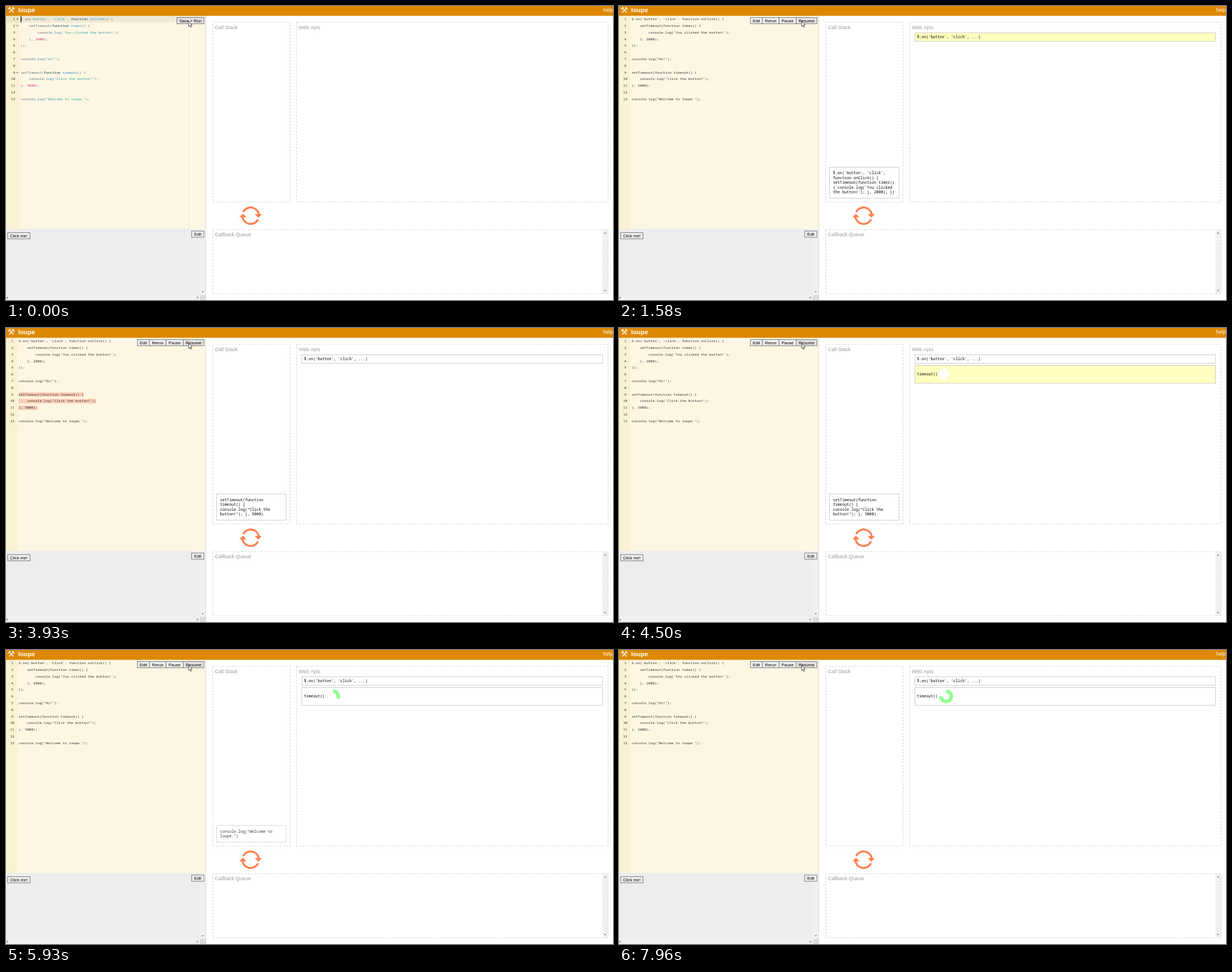
An HTML page with a canvas that plays this animation: 1074 by 521 pixels, repeating every 7.99 s.

```html
<!DOCTYPE html>
<html lang="en">
<head>
<meta charset="utf-8">
<title>Event loop demo</title>
<style>
html, body { margin: 0; width: 100%; height: 100%; overflow: hidden; background: #fff; }
canvas { display: block; }
</style>
</head>
<body>
<canvas id="stage" width="1074" height="521"></canvas>
<script>
const ctx = document.getElementById('stage').getContext('2d');
const LOOP = 7990;
const SANS = '"Liberation Sans", Arial, sans-serif';
const MONO = '"Noto Sans Mono", "DejaVu Sans Mono", monospace';
const CODE_SIZE = 6.19, CARD_SIZE = 6.7;
const LINE = 11.81, CARD_LINE = 8.44;
const TOP = 17.4;
const RUN_AT = 590, TIMER_AT = 4500;

const code = [
  "$.on('button', 'click', function onClick() {",
  '    setTimeout(function timer() {',
  "        console.log('You clicked the button!');",
  '    }, 2000);',
  '});',
  '',
  'console.log("Hi!");',
  '',
  'setTimeout(function timeout() {',
  '    console.log("Click the button!");',
  '}, 5000);',
  '',
  'console.log("Welcome to loupe.");'
];

// Calls on the stack: highlighted source lines, push and pop times
const calls = [
  { from: 0, to: 4, push: 820, pop: 1580, text: [
    "$.on('button', 'click',", 'function onClick() {', 'setTimeout(function timer()',
    "{ console.log('You clicked", "the button!'); }, 2000); })"] },
  { from: 6, to: 6, push: 2310, pop: 3010, text: ['console.log("Hi!")'] },
  { from: 8, to: 10, push: 3790, pop: 4500, text: [
    'setTimeout(function', 'timeout() {', 'console.log("Click the', 'button!"); }, 5000)'] },
  { from: 12, to: 12, push: 5250, pop: 5900, text: ['console.log("Welcome to', 'loupe.")'] }
];

const clamp = v => Math.max(0, Math.min(1, v));

function rect(x, y, w, h, color) {
  ctx.fillStyle = color;
  ctx.fillRect(x, y, w, h);
}

function poly(color, ...points) {
  ctx.fillStyle = color;
  ctx.beginPath();
  points.forEach(p => ctx.lineTo(p[0], p[1]));
  ctx.closePath();
  ctx.fill();
}

// Laid out at ten times the size so that small advances stay fractional
function text(str, x, y, size, family, color, align = 'left', weight = '') {
  ctx.save();
  ctx.translate(x, y);
  ctx.scale(0.1, 0.1);
  ctx.font = `${weight} ${size * 10}px ${family}`;
  ctx.textAlign = align;
  ctx.fillStyle = color;
  ctx.fillText(str, 0, 0);
  const width = ctx.measureText(str).width / 10;
  ctx.restore();
  return width;
}

function frame(x, y, w, h, fill, stroke) {
  rect(x, y, w, h, fill);
  ctx.strokeStyle = stroke;
  ctx.lineWidth = 1;
  ctx.strokeRect(x, y, w, h);
}

function button(label, x, y, w, hover) {
  frame(x, y, w, 11, hover ? '#e6e1e1' : '#efefef', '#777');
  text(label, x + w / 2, y + 8.2, 7.5, SANS, '#000', 'center');
}

function panel(label, x, y, w, h) {
  ctx.strokeStyle = '#d3d3d3';
  ctx.lineWidth = 1.13;
  ctx.setLineDash([3.4, 2.25]);
  ctx.strokeRect(x, y, w, h);
  ctx.setLineDash([]);
  text(label, x + 3.8, y + 12, 9, SANS, '#999');
}

function arrow(x, y, dx, dy) {
  const tip = [x + dx * 1.3, y + dy * 1.3], bx = x - dx * 1.3, by = y - dy * 1.3;
  poly('#8a8a8a', tip, [bx + dy * 2.4, by + dx * 2.4], [bx - dy * 2.4, by - dx * 2.4]);
}

function drawHeader() {
  rect(0, 0, 1074, TOP, '#dd8800');
  text('\u2692', 9.3, 12.1, 14.6, '"DejaVu Sans", sans-serif', '#fff', 'center');
  text('loupe', 21.6, 11.1, 11.25, SANS, '#fff', 'left', 'bold');
  text('help', 1056.8, 10.2, 9, SANS, '#fff');
}

function drawLoopIcon() {
  const color = '#ff7f50';
  ctx.strokeStyle = color;
  ctx.lineWidth = 3.5;
  for (const side of [0, Math.PI]) {
    ctx.save();
    ctx.translate(432.8, 371.6);
    ctx.rotate(side);
    ctx.beginPath();
    ctx.arc(0, 0, 14.6, Math.PI + 0.45, Math.PI * 2 - 0.1);
    ctx.stroke();
    poly(color, [7.2, -2.8], [20, -2.8], [13.6, 3.6]);
    ctx.restore();
  }
}

function drawPanels() {
  panel('Call Stack', 365.8, 28.8, 136.7, 318.4);
  panel('Web Apis', 514.2, 28.8, 551, 318.4);
  rect(1055, 397, 10, 112.5, '#f1f1f1');
  panel('Callback Queue', 365.8, 396.2, 699.4, 113.8);
  arrow(1060, 402, 0, -1);
  arrow(1060, 504.5, 0, 1);
  drawLoopIcon();
}

function drawPreview() {
  rect(0, 395, 353, 126, '#ededed');
  rect(343, 395, 10, 117, '#f1f1f1');
  rect(0, 512, 343, 9, '#f1f1f1');
  rect(343, 512, 10, 9, '#dcdcdc');
  arrow(348, 506.8, 0, 1);
  arrow(1.8, 516.8, -1, 0);
  arrow(339, 516.8, 1, 0);
  button('Click me!', 2.9, 401.6, 39.6);
  button('Edit', 328.5, 398.8, 21.7);
  rect(353, TOP, 1, 521 - TOP, '#d8d8d8');
}

function tokenColor(token) {
  if (/^['"]/.test(token)) return '#2aa198';
  if (/^\d/.test(token)) return '#d33682';
  if (token === 'function') return '#073642';
  if (/^(log|timer|timeout|onClick)$/.test(token)) return '#268bd2';
  return '#586e75';
}

function drawTokens(line, x, y) {
  for (const token of line.match(/'[^']*'|"[^"]*"|\w+|[^\w'"]+/g) || []) {
    x += text(token, x, y, CODE_SIZE, MONO, tokenColor(token));
  }
}

const baseline = i => 25.2 + LINE * i;

function drawEditor() {
  rect(0, TOP, 353, 395 - TOP, '#fdf6e3');
  rect(0, TOP, 24, 395 - TOP, '#fbf1d3');
  rect(24, TOP, 329, LINE, '#eee8d5');
  rect(0, TOP, 24, LINE, '#ede5c1');
  rect(323, TOP, 1, 395 - TOP, '#f1ead7');
  code.forEach((line, i) => {
    const y = baseline(i);
    text(i + 1, 16.3, y, CODE_SIZE, MONO, '#333', 'right');
    if (i < 2 || i === 8) poly('#333', [18.4, y - 2.8], [21.6, y - 2.8], [20, y - 1]);
    drawTokens(line, 26, y);
  });
  rect(26, TOP, 1.2, LINE, '#000');
  button('Save + Run', 302.5, 20.5, 47.7, true);
}

function drawRunner(t) {
  rect(0, TOP, 353, 395 - TOP, '#fdf6e3');
  rect(0, TOP, 20, 395 - TOP, '#fbf1d3');
  const active = calls.find(c => t >= c.push && t < c.pop);
  code.forEach((line, i) => {
    const y = baseline(i);
    if (active && i >= active.from && i <= active.to) {
      rect(22.3, y - 5.9, line.length * CODE_SIZE * 0.6, 8, '#fccdb8');
    }
    text(i + 1, 11, y, CODE_SIZE, MONO, '#333', 'center');
    text(line, 22.3, y, CODE_SIZE, MONO, '#333');
  });
  button('Edit', 232.5, 20.5, 21.3);
  button('Rerun', 253.8, 20.5, 29.4);
  button('Pause', 283.2, 20.5, 30.3);
  button('Resume', 313.5, 20.5, 36.7, true);
}

function drawCall({ text: lines, push, pop }, t) {
  const alpha = Math.min(clamp((t - push) / 110), 1 - clamp((t - pop) / 150));
  if (alpha <= 0) return;
  const h = 12.7 + CARD_LINE * lines.length;
  ctx.globalAlpha = alpha;
  frame(372.5, 340.5 - h, 123, h, '#fff', '#ccc');
  lines.forEach((line, i) =>
    text(line, 378.8, 332.2 - CARD_LINE * (lines.length - 1 - i), CARD_SIZE, MONO, '#000'));
  ctx.globalAlpha = 1;
}

function drawApi(label, start, y, h, t) {
  const white = clamp((t - start) / 150);
  const blue = Math.round(191 + 64 * white);
  frame(523.5, y, 532, h, `rgb(255,255,${blue})`, '#ccc');
  text(label, 527.3, y + h / 2 + 2.1, CARD_SIZE, MONO, '#000');
}

function sector(cx, cy, r, from, to, color) {
  ctx.fillStyle = color;
  ctx.beginPath();
  ctx.moveTo(cx, cy);
  ctx.arc(cx, cy, r, from - Math.PI / 2, to - Math.PI / 2);
  ctx.fill();
}

function drawTimer(t) {
  const cx = 578.7, cy = 82.1, turn = Math.PI * 2;
  sector(cx, cy, 12.4, Math.PI, turn, '#fff');
  if (t >= TIMER_AT + 35) {
    const angle = (t - 4402) * 0.0759 * Math.PI / 180;
    sector(cx, cy, 12.4, 0, angle, '#96fe96');
  }
  sector(cx, cy, 5.8, 0, turn, '#fff');
}

function drawPointer() {
  const shape = [[323.2, 27], [323.2, 36.2], [325.2, 34.4], [326.6, 37.7],
    [328.1, 37], [326.7, 33.9], [329.4, 33.7]];
  poly('#fff', ...shape);
  ctx.strokeStyle = '#222';
  ctx.lineWidth = 0.8;
  ctx.stroke();
}

function draw(t) {
  rect(0, 0, 1074, 521, '#fff');
  drawPanels();
  if (t < RUN_AT) drawEditor();
  else drawRunner(t);
  drawPreview();
  drawHeader();
  calls.forEach(call => drawCall(call, t));
  if (t >= calls[0].pop) drawApi("$.on('button', 'click', ...)", calls[0].pop, 47.5, 15, t);
  if (t >= TIMER_AT) {
    drawApi('timeout()', TIMER_AT, 66.5, 31.5, t);
    drawTimer(t);
  }
  drawPointer();
}

const began = performance.now();
function tick() {
  draw((performance.now() - began) % LOOP);
  requestAnimationFrame(tick);
}
tick();
</script>
</body>
</html>
```
